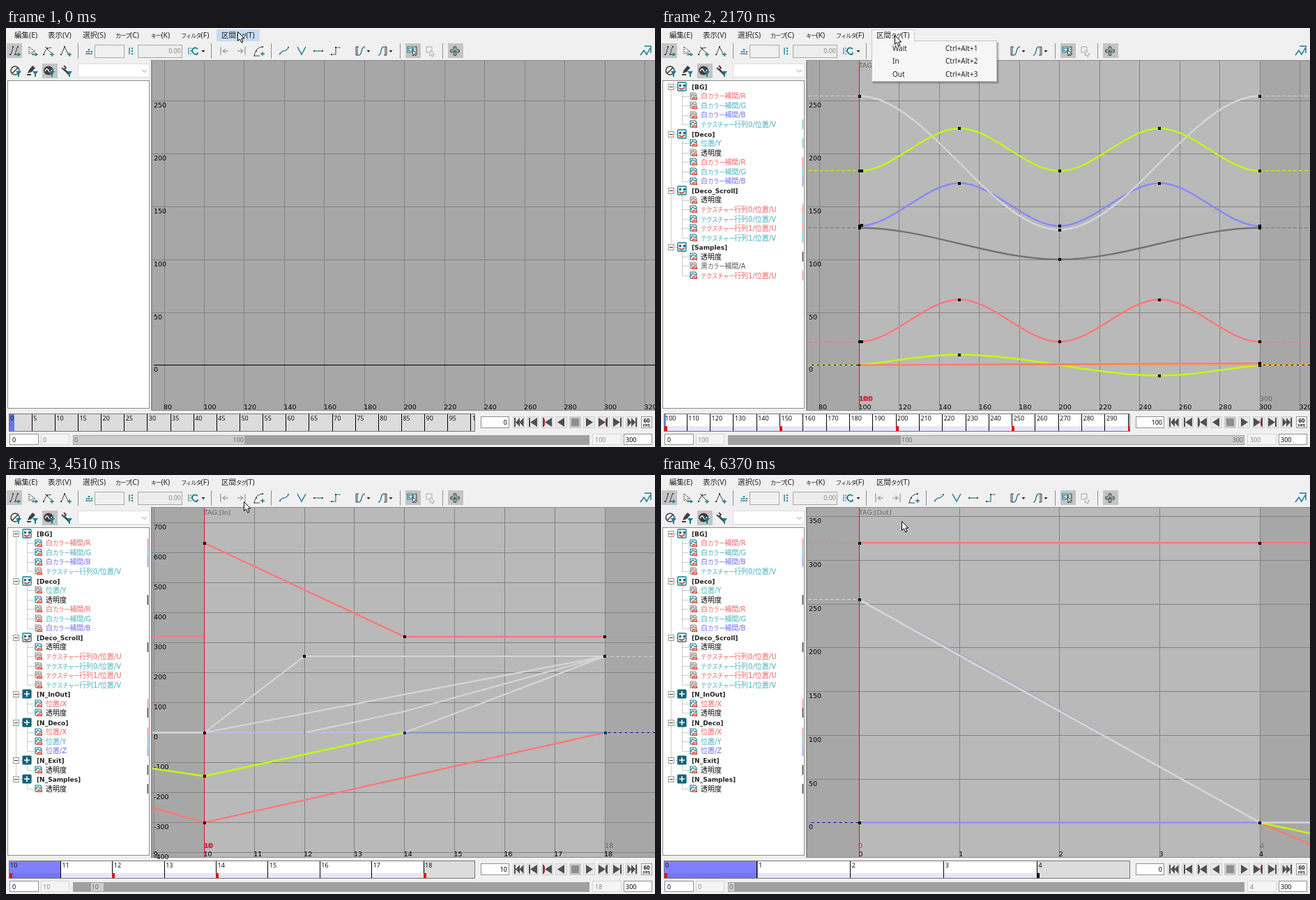
An HTML page that plays this animation: 931x601 px, repeating every 7610 ms.

```html
<!DOCTYPE html>
<html lang="ja">
<head>
<meta charset="utf-8">
<title>Curve editor</title>
<style>
html, body { margin: 0; width: 100%; height: 100%; overflow: hidden; background: #f0f0f0; }
svg { display: block; }
text { white-space: pre; }
.menu { font: 10.5px 'Noto Sans', 'Noto Sans CJK JP', sans-serif; }
.item { font: 10px 'Noto Sans', sans-serif; }
.tree { font: 500 10px 'DejaVu Sans', 'Noto Sans CJK JP', sans-serif; }
.group { font: bold 9px 'DejaVu Sans', sans-serif; }
.axis { font: 9.5px 'DejaVu Sans', sans-serif; }
.now { font: bold 9.5px 'DejaVu Sans', sans-serif; }
.num { font: 9px 'Noto Sans', sans-serif; }
.fps { font: bold 8px 'Noto Sans', sans-serif; }
.fps2 { font: bold 6px 'Noto Sans', sans-serif; }
.k { font-size: .86em; letter-spacing: -.06em; }
.menu .k { font-size: .78em; letter-spacing: -.12em; }
rect, .grid { shape-rendering: crispEdges; }
</style>
</head>
<body>
<svg id="stage" width="931" height="601" viewBox="0 0 931 601"></svg>
<script>
const LOOP = 7610;
const RED = '#ff7878', LIME = '#c0ff00', BLUE = '#8888ff', WHITE = '#d6d6d6', GRAY = '#727272';
const TEAL = '#147c90', DARK = '#404040', OFF = '#a8a8a8';

// Drawing helpers
const rect = (x, y, w, h, fill, stroke) => stroke
  ? `<rect x="${x + .5}" y="${y + .5}" width="${w - 1}" height="${h - 1}" fill="${fill}" stroke="${stroke}"/>`
  : `<rect x="${x}" y="${y}" width="${w}" height="${h}" fill="${fill}"/>`;
const path = (d, color, w = 1, fill = 'none', more = '') =>
  `<path d="${d}" stroke="${color}" stroke-width="${w}" fill="${fill}" ${more}/>`;
const shape = (d, fill) => `<path d="${d}" fill="${fill}"/>`;
const grid = (d, color) => path(d, color, 1, 'none', 'class="grid"');
const text = (x, y, s, cls, fill = '#000', anchor = 'start') =>
  `<text x="${x}" y="${y}" class="${cls}" fill="${fill}" text-anchor="${anchor}">` +
  String(s).replace(/[ァ-ヶー]+/g, '<tspan class="k">$&</tspan>') + '</text>';
const group = (id, body) => `<g id="${id}">${body}</g>`;
const at = (x, y, body) => `<g transform="translate(${x} ${y})">${body}</g>`;
const range = (a, b, step) => Array.from({ length: Math.floor((b - a) / step + 1e-6) + 1 }, (_, i) => a + i * step);

// Menu bar, toolbar and filter row
function chrome() {
  const plus = (x, y) => path(`M${x - 3} ${y}h6M${x} ${y - 3}v6`, TEAL, 1.4);
  const caret = x => shape(`M${x - 2.5} 32h5l-2.5 3z`, '#222');
  const dots = (pts, c) => pts.map(([x, y]) => rect(x - 1, y - 1, 2, 2, c)).join('');
  const funnel = shape('M0 2h8l-3 4v4h-2v-4z', TEAL);
  const tools = [
    [12, path('M-5 5L-2-5M1 5L4-5', DARK) + dots([[-6, 5], [-2, -6], [1, 5], [5, -6]], DARK) + path('M0 5h8m-3-2l3 2l-3 2', TEAL, 1.3)],
    [38, path('M-5-6v10l3-2l2 4l2-1l-2-4h4z', DARK, 1, 'none', 'stroke-dasharray="2 1"') + path('M0 5h7m-3-2l3 2l-3 2', TEAL, 1.3)],
    [61, path('M-7 6Q-5-5 4-5M-5-6L4 3', DARK) + dots([[-7, 5], [-2, -4]], DARK) + plus(5, 5)],
    [86, path('M-7 6L-2-6L3 4', DARK) + dots([[-7, 5], [-2, -6]], DARK) + plus(5, 5)],
    [119, path('M-5 4h10', TEAL, 1.3) + dots([[-3, 1], [0, 1], [4, 1], [0, -2]], TEAL)],
    [179, path('M-2-5v10', TEAL, 1.3) + dots([[2, -4], [2, 0], [2, 4]], TEAL)],
    [268, path('M-6-5v10M-4-4h2M-4 0h2M-4 4h2', TEAL) + path('M7-3C2-7-3-2 0 2S7 6 7 2', TEAL, 1.8)],
    [313, path('M-5-6v12M6 0h-8m4-3l-4 3l4 3', OFF, 1.5)],
    [338, path('M5-6v12M-6 0h8m-4-3l4 3l-4 3', OFF, 1.5)],
    [363, path('M-7 7Q-5-6 6-6M-8 7h9', DARK) + dots([[-4, 0], [5, -6]], DARK) + plus(5, 4)],
    [399, path('M-6 4C-1-4 1 4 6-5', TEAL, 1.3) + dots([[-6, 4], [6, -5]], TEAL)],
    [424, path('M-6-6L0 5L6-6', TEAL, 1.4)],
    [448, path('M-6 0H6', TEAL, 1.2) + dots([[-6, 0], [6, 0]], DARK)],
    [473, path('M-6 5h6v-10h7', TEAL, 1.2) + dots([[-6, 5], [0, -5]], DARK)],
    [508, path('M-2-6h-4v12h4M-4-6v12', DARK) + path('M-2 6C4 6 0-6 7-6', TEAL, 1.4)],
    [540, path('M-6 6C0 6-4-6 2-6', TEAL, 1.4) + path('M2-6h4v12h-4M4-6v12', DARK)],
    [583, path('M-7-6h8v8h-8zM-5-4h5v4h-5z', TEAL, 1.2, '#eee') + path('M3-6h3v8M0 6h6', DARK) + path('M0-1l7 5l-4 0l-2 3z', DARK, 1, '#fff')],
    [609, path('M-6-6h8v8h-8z', OFF) + path('M0-1l6 6l-3 0l1 3l-2 0l-1-3l-2 2z', OFF, 1, '#fff')],
    [644, path('M-2-6h4v4h4v4h-4v4h-4v-4h-4v-4h4z', DARK, 1, '#eee') + path('M-7 0H7M0-7V7', DARK) + rect(-2, -1, 4, 3, TEAL)],
    [918, path('M-8 6L-3-1L1 5L6-4M-2-7H7V3', TEAL, 1.5)]
  ];
  const filters = [
    [13, path('M-6 0a6 6 0 1 0 12 0a6 6 0 1 0-12 0M-4 4L4-4', DARK, 1.6)],
    [37, shape('M-6 4l2-5l5-6l4 3l-5 6zM-7 5h6v2h-6z', DARK)],
    [61, shape('M-7 0a7 6.5 0 1 0 14 0a7 6.5 0 1 0-14 0', DARK) + path('M-5 1Q-2-5 0 0T5-1', '#fff', 1.3)],
    [86, path('M5 6L-2-1', DARK, 2.6) + path('M-6-4L-3-1L0-4L-3-7', DARK, 1.8)]
  ];
  const menus = [[12, '編集(E)'], [60, '表示(V)'], [110, '選択(S)'], [157, 'カーブ(C)'], [208, 'キー(K)'], [251, 'フィルタ(F)']];
  return menus.map(([x, s]) => text(x, 13.5, s, 'menu', '#222')).join('') +
    [[1, 22], [573, 22], [634, 22], [52, 51]].map(([x, y]) => rect(x, y, 22, 21, '#c4c4c4')).join('') +
    [103, 294, 380, 565, 626].map(x => rect(x, 22, 1, 22, '#8e8e8e')).join('') +
    rect(127, 24, 43, 19, '#f0f0f0', '#a9a9a9') + rect(189, 24, 64, 19, '#ededed', '#a9a9a9') +
    text(251, 36, '0.00', 'num', '#888', 'end') +
    tools.map(([x, s]) => at(x, 33, s)).join('') + [283, 520, 552].map(caret).join('') +
    filters.map(([x, s]) => at(x, 61, s) + at(x + 1, 60, funnel)).join('') +
    rect(103, 51, 103, 20, '#fff', '#dcdcdc') + path('M195 60l3.5 3.5l3.5-3.5', '#999') +
    rect(2, 75, 204, 471, '#fff', '#8a8a8a');
}

// Curve tree
const ITEMS = { O: ['透明度', '#000'], A: ['黒カラー補間/A', '#555'] };
[['R', 'X', 'U', '#f06464'], ['G', 'Y', 'V', '#46b0be'], ['B', 'Z', '', '#6e6ef4']].forEach(([c, p, u, color]) => {
  ITEMS[c] = ['白カラー補間/' + c, color];
  ITEMS[p] = ['位置/' + p, color];
  if (u) [0, 1].forEach(n => ITEMS[u + n] = [`テクスチャー行列${n}/位置/${u}`, color]);
});
// a leading minus marks a curve without keys
const WAIT = 'BG:-R -G -B V0|Deco:Y -O R G B|Deco_Scroll:-O U0 V0 U1 V1|Samples:O -A U1';
const INOUT = 'BG:R G B -V0|Deco:-Y O -R -G -B|Deco_Scroll:O -U0 -V0 -U1 -V1|N_InOut:X O|N_Deco:X Y Z|N_Exit:O|N_Samples:O';

function eachRow(spec, onGroup, onItem) {
  let i = 0, out = '';
  const next = () => 84 + 13.55 * i++;
  for (const part of spec.split('|')) {
    const [name, list] = part.split(':'), keys = list.split(' ');
    out += onGroup(next(), name, keys.length);
    for (const k of keys) out += onItem(next(), ITEMS[k.replace('-', '')], k[0] !== '-');
  }
  return out;
}
const mark = (y, color) => rect(203, Math.round(y - 7), 1, 14, color);
const marks = spec => eachRow(spec, () => '', (y, [, color]) => mark(y, color));

function tree(spec) {
  const dotted = d => path(d, '#999', 1, 'none', 'stroke-dasharray="1 1"');
  const box = 'M-5-6H5Q6-6 6-5V5Q6 6 5 6H-5Q-6 6-6 5V-5Q-6-6-5-6Z';
  const node = path(box, '#0f6478', 1.2, '#0f6478') + path('M-4 0h8M0-4v8', '#fff', 1.6);
  const pane = path(box, TEAL, 1.4, '#eafafa') + rect(-4, -3, 3, 3, '#0f6478') + rect(2, -3, 3, 3, '#0f6478') +
    path('M-4 2q4 4 8-1', '#e0452f', 2);
  const item = on => path('M-4-5H3L5-3V4H-4Z', on ? TEAL : '#999', 1.2, on ? '#fff' : '#ddd') +
    path('M-3 1Q-1-5 1-2T4-2', on ? '#0f6478' : '#888', 1.1) +
    shape('M-2 5Q-1 0 2 1T6 1V5Z', '#e0452f') + path('M0 4q1-2 2-1t3-1', '#fff', .9);
  let top = 84;
  return eachRow(spec, (y, name, n) => {
    y = Math.round(y);
    const s = dotted(`M14.5 ${top}V${y}M18 ${y + .5}H24M30.5 ${y + 7}V${y + 13.55 * n}`) +
      rect(10, y - 4, 9, 9, '#fff', '#999') + rect(12, y, 5, 1, '#333') +
      at(30, y, name.startsWith('N_') ? node : pane) + text(44, y + 3.5, `[${name}]`, 'group', '#222');
    top = y + 5;
    return s;
  }, (y, [label, color], on) => {
    const yi = Math.round(y);
    return dotted(`M31 ${yi + .5}H40`) + at(46, yi, item(on)) +
      text(57, y + 3.8, label, 'tree', color) + (on ? mark(y, color) : '');
  });
}

// Graph panel
const LEFT = 284.5, RIGHT = 859;
const straight = pts => 'M' + pts.map(p => p.join(' ')).join('L');
const smooth = pts => pts.map(([x, y], i) => {
  if (!i) return `M${x} ${y}`;
  const [px, py] = pts[i - 1], d = (x - px) / 3;
  return `C${px + d} ${py} ${x - d} ${y} ${x} ${y}`;
}).join('');
const curve = (d, color, w = 2.4) => path(d, color, w);
const dash = (x1, x2, y, color) => path(`M${x1} ${y}H${x2}`, color, 1, 'none', 'stroke-dasharray="5 3"');
const bothDash = (y, color) => dash(211, LEFT, y, color) + dash(RIGHT, 931, y, color);
const keys = (x, ...ys) => ys.map(y => rect(Math.round(x - 2), Math.round(y - 2), 4, 4, '#000')).join('');

function graph({ from, to, xs, ys, zero, unit, tag, curves }) {
  const X = f => LEFT + (f - from) * (RIGHT - LEFT) / (to - from);
  const Y = v => zero - v * unit;
  const rows = range(...ys), cols = range(...xs);
  const now = from
    ? text(283, 535, from, 'axis', '#c04858') + text(284, 535, from, 'now', '#d81830')
    : text(283, 535, from, 'axis', '#d02038');
  return rect(208, 46, 723, 503, '#8c8c8c') + rect(210, 47, 721, 501, '#a7a7a7') +
    (tag ? rect(285, 47, 575, 501, '#b9b9b9') : '') +
    grid(cols.filter(f => X(f) > 212).map(f => `M${Math.floor(X(f)) + .5} 47V548`).join('') +
      rows.filter(v => v).map(v => `M210 ${Math.floor(Y(v) + .3) + .5}H931`).join(''), '#838383') +
    grid(`M212 ${zero}H931`, '#000') +
    rows.map(v => text(212, Y(v) + 9.8, v, 'axis')).join('') +
    cols.map(f => text(Math.max(211, X(f) - 1), 547, f, 'axis')).join('') +
    (tag ? text(284, 57, `TAG:[${tag}]`, 'axis', '#626262') + text(859, 535, to, 'axis', '#646464') +
      grid(`M${LEFT} 47V548`, '#e0102c') + now : '') +
    (curves ? curves(X, Y) : '');
}

function waitCurves(X) {
  const at5 = (a, b) => [a, b, a, b, a].map((y, i) => [X(100 + 50 * i), y]);
  const at3 = (a, b) => [a, b, a].map((y, i) => [X(100 + 100 * i), y]);
  const sets = [[at3(286.5, 332), GRAY], [at5(284, 222.5), BLUE], [at3(97.5, 289.5), WHITE],
    [at5(205, 144), LIME], [at5(450, 389.5), RED]];
  const wave = `M${LEFT} 483.5C${X(116.7)} 478.5 ${X(133.3)} 468.5 ${X(150)} 468.5` +
    `C${X(183.3)} 468.5 ${X(216.7)} 498.5 ${X(250)} 498.5C${X(266.7)} 498.5 ${X(283.3)} 488.5 ${RIGHT} 483.5`;
  return bothDash(97.5, '#ccc') + bothDash(204.5, LIME) + bothDash(286.5, '#77778c') + bothDash(450.5, RED) +
    bothDash(483.5, LIME) + dash(RIGHT, 931, 482.5, '#ff8a50') +
    sets.map(([p, c]) => curve(smooth(p), c)).join('') + curve(wave, LIME) +
    curve(`M${LEFT} 483.5H${RIGHT}`, '#ffa030', 1.4) + curve(`M${LEFT} 483.5L${RIGHT} 480.8`, RED, 2.2) +
    sets.map(([p]) => p.map(q => keys(...q)).join('')).join('') +
    keys(287.5, 205, 283, 450) + keys(X(150), 468.5) + keys(X(250), 498.5) + keys(RIGHT, 481, 484) +
    rect(283, 482, 3, 3, '#a01020');
}

function inCurves(X) {
  const a = X(12), b = X(14), z = 369.5;
  const rise = x => curve(`M${x} ${z}L${RIGHT} 260`, WHITE, 2.2);
  return curve(`M210 232H${LEFT}`, '#f08080', 2) + curve(`M210 ${z}H${LEFT}`, WHITE) +
    curve(`M${LEFT} 97.5L${b} 232H${RIGHT}`, RED) + path(`M${RIGHT} 232.5H931`, '#c98c8c') +
    curve(`M210 477L${LEFT} 498.5L${RIGHT} ${z}`, RED) +
    curve(`M${LEFT} ${z}H${b}`, '#bcbcec', 2.2) + curve(`M${b} ${z}H${RIGHT}`, '#7c94cc', 2.2) +
    rise(LEFT) + curve(`M${a} ${z}Q${a + 40} ${z - 8} ${b} 339L${RIGHT} 260`, WHITE, 2.2) + rise(b) +
    curve(`M${LEFT} ${z}L${a} 260H${RIGHT}`, WHITE, 2.2) +
    curve(`M210 421L${LEFT} 432L${b} ${z}`, LIME) +
    dash(RIGHT, 931, 260.5, '#d0d0d0') + dash(RIGHT, 931, z, BLUE) +
    grid(`M${LEFT} 97V548`, '#e0102c') +
    keys(LEFT, 97.5, z, 432, 498.5) + keys(a, 260) + rect(a - 1, 368, 3, 3, '#8a8ae0') +
    keys(b, 232) + rect(b - 2, 368, 4, 4, '#203070') + keys(RIGHT, 232, 260) + rect(858, 368, 4, 4, '#203070');
}

function outCurves() {
  const z = 498.5;
  return dash(211, LEFT, 97.5, '#c09090') + dash(211, LEFT, 178.5, '#d8d8d8') + dash(211, LEFT, z, BLUE) +
    curve(`M${LEFT} 97.3H931`, RED) + curve(`M${LEFT} ${z}H${RIGHT}`, BLUE, 2.2) +
    curve(`M${LEFT} 179Q430 255 640 375`, '#a4a4d4', 1.2) +
    curve(`M${RIGHT} ${z}L931 530`, RED) + curve(`M${RIGHT} ${z}L931 514`, LIME) +
    curve(`M${LEFT} 179L${RIGHT} ${z}H931`, WHITE, 2.6) +
    keys(LEFT, 97.5, 179, z) + keys(RIGHT, 97.5, z);
}

// Time bar, range bar and play buttons
function timeBar({ from, to, step, white, reds = [], blacks = [] }) {
  const cell = 669.5 / (to - from + 1), X = f => 4 + (f - from) * cell, end = X(to);
  const key = (f, c) => rect(Math.max(5, Math.floor(X(f))), 571, Math.min(4, 672 - Math.floor(X(f))), 7, c);
  const wide = cell > 20;
  return rect(4, 553, 669, 26, '#dcdcdc', '#777') +
    (white ? rect(5, 554, end - 5, 24, '#fff') + rect(5, 571, end - 5, 7, '#e6e6fc') : '') +
    (wide ? rect(5, 554, cell, 24, '#8080ff') + rect(5, 571, cell, 7, '#7474f4')
      : rect(5, 554, white ? 2 : cell, 24, white ? '#7a7aff' : '#6878e0')) +
    grid(range(from, to, step).slice(1).map(f => `M${Math.floor(X(f)) + .5} 554V578`).join(''), '#000') +
    `<svg x="0" y="553" width="672" height="26">` +
    range(from, to, step).map(f => text(X(f) + 2, 10, f, 'num', '#111')).join('') + '</svg>' +
    reds.map(f => key(f, '#e81010')).join('') + blacks.map(f => key(f, '#000')).join('');
}

function bottom(s) {
  const { from, to } = s, a = 96 + from * 2.47, w = (to - from) * 2.47;
  return timeBar(s) + text(719, 569, from, 'num', '#000', 'end') +
    text(53, 593.5, from, 'num', '#888') + text(845, 593.5, to, 'num', '#888') +
    rect(Math.round(a), 584, Math.round(w), 14, '#cdcdcd', '#a0a0a0') +
    text(a + 2, 594, from, 'num', '#666') + (w > 60 ? text(a + w - 2, 594, to, 'num', '#666', 'end') : '');
}

function controls() {
  const tri = (x, d, w = 5) => shape(`M${x - w * d} 559v13l${2 * w * d}-6.5z`, '#505050');
  const bar = (x, c = '#505050') => rect(x, 559, 2, 13, c);
  const red = x => rect(x, 561, 1, 9, '#d02020');
  const stop = rect(811, 560, 11, 11, '#8f8f8f');
  const glyphs = [bar(729) + tri(734, -1, 3) + tri(739.5, -1, 3), bar(750) + tri(757, -1),
    bar(770) + red(772) + tri(778, -1), tri(796, -1), stop, tri(837, 1),
    tri(855, 1) + red(860) + bar(861), tri(876, 1) + bar(881),
    tri(894.5, 1, 3) + tri(900, 1, 3) + bar(903)];
  return rect(681, 557, 41, 17, '#fff', '#909090') +
    glyphs.map((g, i) => rect(Math.round(727 + 20.25 * i), 557, 17, 17, i === 4 ? '#c8c8c8' : '#e8e8e8', '#d0d0d0') + g).join('') +
    rect(911, 557, 16, 17, '#f8f8f8', '#999') + text(919, 565.5, '60', 'fps', '#222', 'middle') +
    text(919, 572, 'FPS', 'fps2', '#222', 'middle') +
    rect(5, 582, 42, 16, '#fff', '#909090') + text(9, 593.5, '0', 'num') +
    rect(50, 582, 41, 16, '#f4f4f4', '#d6d6d6') + rect(841, 582, 42, 16, '#f4f4f4', '#d6d6d6') +
    rect(886, 582, 41, 16, '#fff', '#909090') + text(889, 593.5, '300', 'num') +
    rect(96, 584, 741, 14, '#a0a0a0');
}

// Editor states
const waitView = { from: 100, to: 300, xs: [80, 320, 20], ys: [0, 250, 50], zero: 483.5, unit: 1.516 };
const states = {
  idle: graph(waitView) + bottom({ from: 0, to: 100, step: 5 }),
  wait: graph({ ...waitView, tag: 'Wait', curves: waitCurves }) + tree(WAIT) +
    bottom({ from: 100, to: 300, step: 10, white: true, reds: [100, 150, 200, 250, 300] }),
  in: graph({ from: 10, to: 18, xs: [9, 18, 1], ys: [-400, 700, 100], zero: 369.5, unit: .43, tag: 'In', curves: inCurves }) +
    tree(INOUT) + bottom({ from: 10, to: 18, step: 1, white: true, reds: [10, 12, 14, 18] }),
  out: graph({ from: 0, to: 4, xs: [0, 4, 1], ys: [0, 350, 50], zero: 498.5, unit: 1.255, tag: 'Out', curves: outCurves }) +
    tree(INOUT) + bottom({ from: 0, to: 4, step: 1, white: true, reds: [0], blacks: [4] })
};

const dropdown = rect(304, 21, 181, 59, 'rgba(0,0,0,.16)') + rect(303, 20, 180, 58, 'rgba(0,0,0,.18)') +
  rect(302, 2, 62, 18, '#f6f6f6', '#cfcfcf') + rect(302, 18, 180, 59, '#f6f6f6', '#c4c4c4') + rect(303, 17, 60, 3, '#f6f6f6') +
  '<rect id="pick" x="303" width="176" height="18" fill="#c8def5"/>' +
  ['Wait', 'In', 'Out'].map((s, i) => text(332, 32.5 + 18.5 * i, s, 'item', '#222') +
    text(408, 32.5 + 18.5 * i, 'Ctrl+Alt+' + (i + 1), 'item', '#222')).join('');

const stage = document.getElementById('stage');
stage.innerHTML = rect(0, 0, 931, 601, '#f0f0f0') + chrome() + controls() +
  Object.entries(states).map(([k, s]) => group(k, s)).join('') +
  group('preWait', marks(WAIT)) + group('preIn', marks(INOUT)) +
  group('hover', rect(302, 2, 62, 17, '#c5dcf2')) + group('drop', dropdown) +
  text(309, 13.5, '区間タグ(T)', 'menu', '#222') +
  group('cursor', path('M.5.5V13.5L3.5 10.8L5.8 16L8 15L5.8 10H9.8Z', '#000', 1, '#fff'));

// Timeline: pointer moves are [first step, last step, steps, x, y]
const START = [332, 5];
const MOVES = [
  [680, 850, 3, 349, 34], [1620, 1870, 4, 335, 10], [2720, 2950, 4, 347, 38], [3100, 3270, 3, 346, 47],
  [4510, 4830, 5, 320, 2], [5530, 5760, 4, 346, 63], [5910, 6010, 2, 345, 66]
];
const OPEN = [[130, 1240], [2170, 3810], [5130, 6370]];
const SHOWN = { idle: [0, 1320], wait: [1320, 3880], in: [3880, 6370], out: [6370, LOOP], preWait: [1240, 1320], preIn: [3810, 3880] };
const within = (t, [a, b]) => t >= a && t < b;
const el = id => document.getElementById(id);
const show = (id, on) => el(id).setAttribute('display', on ? 'inline' : 'none');

function pointer(t) {
  let [x, y] = START;
  for (const [a, b, n, tx, ty] of MOVES) {
    if (t < a) break;
    const step = Math.min(n, 1 + Math.floor((t - a) / (b - a) * (n - 1) + 1e-6)), p = step / n;
    x += (tx - x) * p;
    y += (ty - y) * p;
  }
  return [Math.round(x), Math.round(y)];
}

function draw(t) {
  const [x, y] = pointer(t), open = OPEN.some(o => within(t, o));
  for (const id in SHOWN) show(id, within(t, SHOWN[id]));
  show('drop', open);
  show('hover', !open && y < 20);
  show('pick', open && y >= 20);
  el('pick').setAttribute('y', 20 + 18.5 * Math.min(2, Math.max(0, Math.floor((y - 20) / 18.4))));
  el('cursor').setAttribute('transform', `translate(${x} ${y})`);
}

const begin = performance.now();
function tick() {
  draw((performance.now() - begin) % LOOP);
  requestAnimationFrame(tick);
}
draw(0);
requestAnimationFrame(tick);
</script>
</body>
</html>
```
